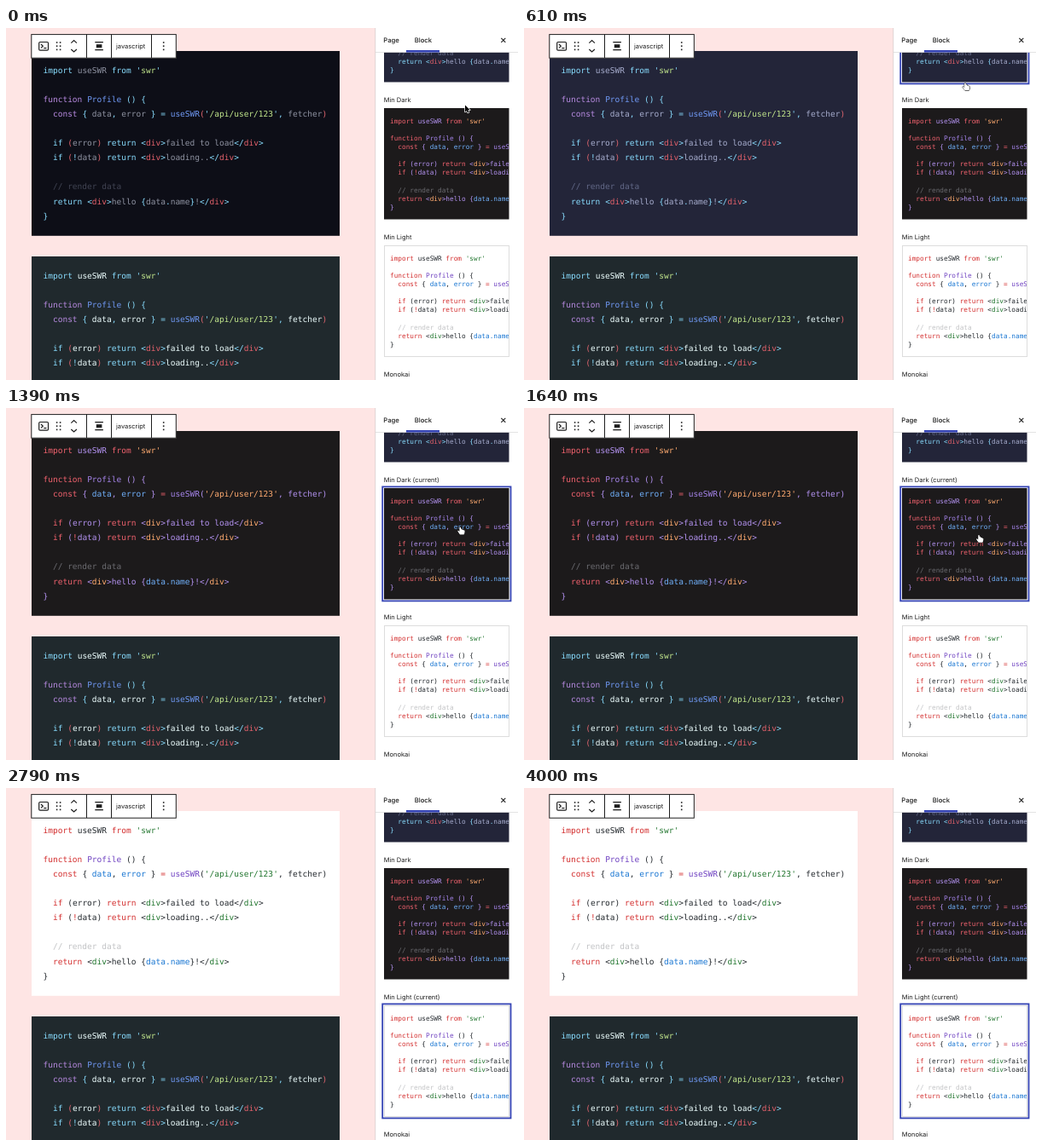
An HTML page with a canvas for the animation above (4030 ms loop, 600 by 413 pixels).

```html
<!DOCTYPE html>
<html lang="en">
<meta charset="utf-8">
<title>Code block theme picker</title>
<style>
  html, body { margin: 0; width: 600px; height: 413px; overflow: hidden; }
  canvas { display: block; }
</style>
<canvas id="stage" width="600" height="413"></canvas>
<script>
const ctx = document.getElementById('stage').getContext('2d');
const LOOP = 4030, BLUE = '#3443b4', INK = '#1e1e1e';
const CODE_FONT = '"DejaVu Sans Mono", monospace';
const UI_FONT = 'Inter, sans-serif';

// Each token is a role letter followed by its text.
const LINES = [
  'kimport |vuseSWR |kfrom |q\'|tswr|q\'', '',
  'sfunction |fProfile |p() {',
  's  const |p{ |ddata|p, |derror |p} |o= |fuseSWR|r(|q\'|t/api/user/123|q\'|p, |vfetcher|r)', '',
  'k  if |r(|verror|r) |kreturn |p<|gdiv|p>|vfailed to load|p</|gdiv|p>',
  'k  if |r(|o!|vdata|r) |kreturn |p<|gdiv|p>|vloading..|p</|gdiv|p>', '',
  'c  // render data',
  'k  return |p<|gdiv|p>|vhello |p{|ddata|m.|dname|p}|v!|p</|gdiv|p>',
  'p}'
].map(line => line ? line.split('|').map(t => [t[0], t.slice(1)]) : []);

const material = (bg, v, c) => ({
  bg, v, c, d: v, k: '#89ddff', p: '#89ddff', o: '#89ddff', q: '#89ddff', m: '#89ddff',
  s: '#b78ae0', f: '#7099f5', r: '#e0656e', g: '#e0606a', t: '#c3e88d'
});
const minimal = (bg, v, c, key, fn, string, constant) => ({
  bg, v, c, p: v, r: v, k: key, s: key, o: key, f: fn,
  q: string, t: string, g: string, d: constant, m: constant
});
const themes = {
  ocean: material('#0d0e17', '#8f93a2', '#414453'),
  palenight: material('#232539', '#a6accd', '#626887'),
  teal: material('#20292d', '#eeffff', '#546e7a'),
  dark: minimal('#1c1a1b', '#b392f0', '#6b6b70', '#f0626e', '#a584ea', '#ffab70', '#70b0fa'),
  light: minimal('#ffffff', '#24292e', '#c2c3c5', '#d32f2f', '#6f42c1', '#22762f', '#1976d2')
};

function fill(color, x, y, w, h) {
  ctx.fillStyle = color;
  ctx.fillRect(x, y, w, h);
}
function frame(color, x, y, w, h, width = 1) {
  ctx.strokeStyle = color;
  ctx.lineWidth = width;
  ctx.strokeRect(x, y, w, h);
}
function line(points, width = 1.2, color = INK) {
  ctx.strokeStyle = color;
  ctx.lineWidth = width;
  ctx.beginPath();
  points.forEach(([x, y]) => ctx.lineTo(x, y));
  ctx.stroke();
}
function label(text, x, y, size = 7.5, weight = 400) {
  ctx.font = `${weight} ${size}px ${UI_FONT}`;
  ctx.fillStyle = INK;
  ctx.fillText(text, x, y);
}
function code(theme, x, y, size, pitch) {
  ctx.font = `${size}px ${CODE_FONT}`;
  const advance = size * 0.602;
  LINES.forEach((tokens, row) => {
    let column = 0;
    for (const [role, text] of tokens) {
      ctx.fillStyle = theme[role];
      ctx.fillText(text, x + column * advance, y + row * pitch);
      column += text.length;
    }
  });
}
function block(theme, y, height) {
  fill(theme.bg, 30, y, 361, height);
  code(theme, 43.5, y + 25.6, 9.53, 17.1);
}
function card(theme, y, selected) {
  ctx.save();
  ctx.beginPath();
  ctx.rect(443, y, 146.5, 130.5);
  ctx.clip();
  fill(theme.bg, 443, y, 147, 131);
  code(theme, 450, y + 17.5, 7.75, 10.15);
  ctx.restore();
  if (theme === themes.light) frame('#dddddd', 443.5, y + 0.5, 146, 130);
  if (selected) frame(BLUE, 441.2, y - 1.6, 150.3, 134, 1.8);
}
function dots(xs) {
  for (const x of xs) for (const y of [17, 21.2, 25.4]) fill(INK, x - 0.8, y - 0.8, 1.6, 1.6);
}

function toolbar() {
  fill('#ffffff', 30, 7.5, 169.5, 28);
  frame(INK, 29.8, 7.6, 169.5, 27.6);
  for (const x of [94.5, 123.5, 170.5]) line([[x, 7.5], [x, 35]], 1);
  ctx.beginPath();
  ctx.roundRect(38.7, 16.5, 10.8, 9.6, 1.2);
  ctx.lineWidth = 1.2;
  ctx.stroke();
  line([[41, 19], [43.3, 21.2], [41, 23.4]]);
  line([[44.3, 23.6], [47.4, 23.6]]);
  dots([59.6, 63.6]);
  line([[76.3, 17.6], [79.6, 14.6], [82.9, 17.6]]);
  line([[76.3, 25], [79.6, 28], [82.9, 25]]);
  fill(INK, 104.3, 16, 9.6, 1.3);
  fill(INK, 105.8, 19.2, 6.6, 4);
  fill(INK, 104.3, 25, 9.6, 1.3);
  label('javascript', 129, 24);
  dots([184.7]);
}

function sidebar(selected, current) {
  fill('#ffffff', 433, 0, 167, 413);
  card(themes.palenight, -67, selected === 'palenight');
  card(themes.dark, 94, selected === 'dark');
  card(themes.light, 255, selected === 'light');
  const title = (name, key) => name + (current === key ? ' (current)' : '');
  label(title('Min Dark', 'dark'), 442.7, 86.8);
  label(title('Min Light', 'light'), 442.7, 247.8);
  label('Monokai', 442.7, 408.8);
  fill('#ffffff', 433, 0, 167, 28.5);
  fill('#dddddd', 433, 28, 167, 0.8);
  fill('#d8d0d0', 432.4, 0, 0.8, 413);
  fill(BLUE, 469, 26, 39, 2.6);
  label('Page', 442.3, 17.2, 7.7, 500);
  label('Block', 478.7, 17.2, 7.7, 500);
  line([[580.3, 11.8], [585.3, 16.8]], 1.1);
  line([[585.3, 11.8], [580.3, 16.8]], 1.1);
}

const ARROW = new Path2D('M0 0V8L1.9 6.4L3.1 9L4.5 8.4L3.3 5.8H5.8Z');
const HAND = new Path2D('M-.8 .6Q0-.5 .8 .6V3Q2-.1+2.4 3.3Q3.6 2.5 4 3.8Q5.3 3.3 5.4 4.8' +
  'Q5.4 7 4.4 8.8H-.2Q-1.5 7.2-2.8 5.2Q-3.2 3.8-1.8 4.4L-.8 5.4Z');
// Time, x, y of the pointer tip.
const PATH = [
  [0, 538, 90.5], [210, 538, 90.5], [420, 517, 64.5], [690, 517, 64.5],
  [960, 532, 137], [1300, 532, 137], [1600, 533, 149], [1850, 533, 149],
  [2240, 546.5, 327], [2600, 546.5, 327]
];
function pointer(t) {
  const next = PATH.findIndex(key => key[0] > t);
  if (next < 0) return;
  const [t0, x0, y0] = PATH[next - 1], [t1, x1, y1] = PATH[next];
  const u = (t - t0) / (t1 - t0), ease = u * u * (3 - 2 * u);
  const x = x0 + (x1 - x0) * ease, y = y0 + (y1 - y0) * ease;
  const overCard = y < 66 || (y > 94 && y < 225) || y > 255;
  ctx.save();
  ctx.translate(x, y);
  ctx.lineJoin = 'round';
  ctx.lineWidth = overCard ? 1 : 1.4;
  ctx.strokeStyle = overCard ? '#000000' : '#ffffff';
  ctx.fillStyle = overCard ? '#ffffff' : '#000000';
  const shape = overCard ? HAND : ARROW;
  ctx.stroke(shape);
  ctx.fill(shape);
  ctx.restore();
}

// The latest step whose time has come.
const latest = (steps, t) => steps.filter(([start]) => start <= t).pop()[1];
const SELECTED = [[0, ''], [420, 'palenight'], [1200, 'dark'], [2240, 'light']];
const CURRENT = [[0, 'ocean'], [570, 'palenight'], [1340, 'dark'], [2450, 'light']];

function draw(now) {
  const t = now % LOOP, current = latest(CURRENT, t);
  ctx.textRendering = 'geometricPrecision';
  fill('#fee5e4', 0, 0, 600, 413);
  block(themes[current], 27, 216.8);
  block(themes.teal, 268, 145);
  toolbar();
  sidebar(latest(SELECTED, t), current);
  pointer(t);
  requestAnimationFrame(draw);
}
requestAnimationFrame(draw);
</script>
</html>
```
